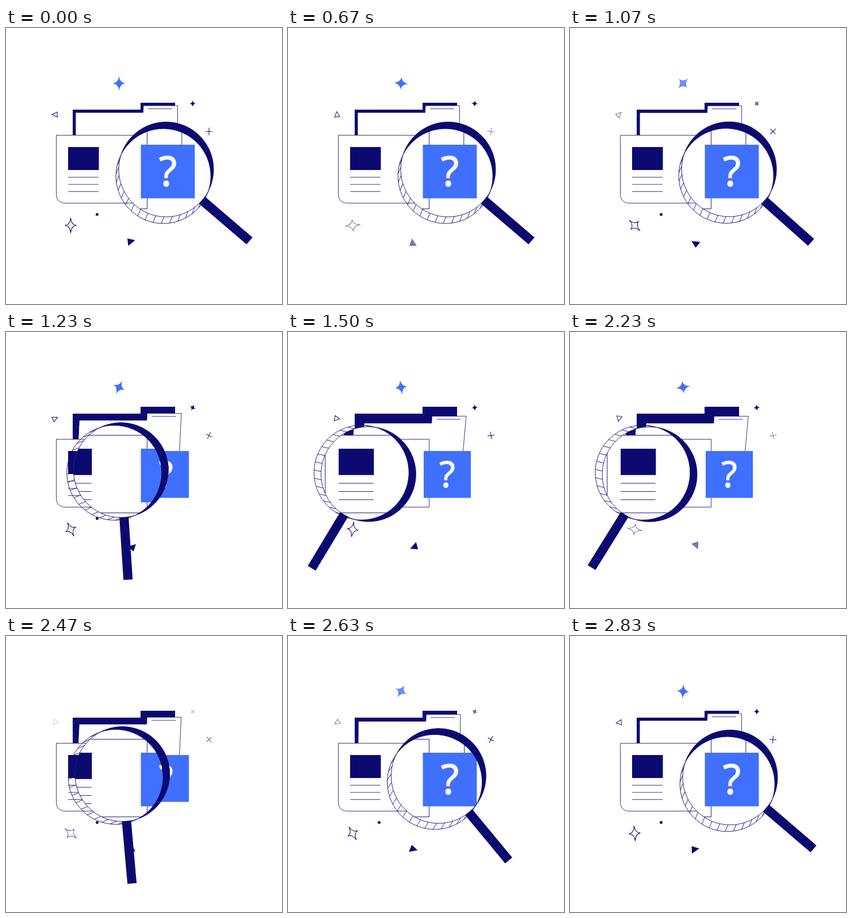
Recreate the animation shown at these times as an HTML page. Size 480 by 480 pixels, loop 2.87 s.

```html
<!DOCTYPE html>
<html lang="en">
<head>
<meta charset="utf-8">
<title>Folder search</title>
<style>
  html, body { margin: 0; width: 100%; height: 100%; overflow: hidden; background: #fff; }
  svg { display: block; width: 100vw; height: 100vh; }
  .line { fill: none; stroke: #0c0a70; stroke-width: .8; }
  .sheet { fill: #fff; stroke: #0c0a70; stroke-width: .8; }
  .navy { fill: #0c0a70; }
  .blue { fill: #4070ff; }
  #decor .line { stroke-width: 1; }
  text {
    font: 63px "Open Sans", "Noto Sans", sans-serif; text-anchor: middle;
    fill: #fff; stroke: #fff; stroke-width: 1.4;
  }
</style>
</head>
<body>
<svg viewBox="0 0 480 480">
  <defs>
    <clipPath id="clip"><circle id="hole" r="82.5"/></clipPath>
  </defs>

  <g id="scene">
    <path class="navy" d="M116 280V142H234V130H294V280Z"/>
    <path class="sheet" id="paper"/>
    <path class="line" id="rule" d="M247 140.5H289"/>
    <path class="sheet" d="M87.5 186.5H245.5V304.5H101.5a14 14 0 0 1-14-14Z"/>
    <path class="navy" d="M108 207H161.5V247H108Z"/>
    <path class="line" d="M108 259.5H161M108 272H161M108 284.5H161"/>
    <path class="blue" d="M236 207H318V288.5H236Z"/>
    <text x="277" y="270.3">?</text>
  </g>

  <g id="decor"></g>

  <circle id="glass" r="82.5" fill="#fff"/>
  <g clip-path="url(#clip)">
    <use href="#scene" transform="translate(246 234.6) scale(1.144) translate(-246 -234.6)"/>
  </g>
  <!-- Rim drawn with its depth along +x -->
  <g id="loupe">
    <path class="navy" d="M6.23-82.26A82.5 82.5 0 1 0 6.23 82.26A82.5 82.5 0 0 1 6.23-82.26Z"/>
    <circle class="line" r="82.5"/>
    <circle class="line" r="82.5" cx="12.46"/>
    <path class="line" id="hatch"/>
    <rect class="navy" x="82" y="-8" width="109" height="16" transform="rotate(-72)"/>
  </g>
</svg>
<script>
const LOOP = 2870, MOVE = 525, OUT = 1041, BACK = 2308, BLINK_GAP = 1560, BLINK_HALF = 200;
const $ = id => document.getElementById(id);
const clamp = v => Math.min(1, Math.max(0, v));

const star = (w, h, c) =>
  `M0 ${-h}Q${c} ${-c} ${w} 0Q${c} ${c} 0 ${h}Q${-c} ${c} ${-w} 0Q${-c} ${-c} 0 ${-h}Z`;

// class, path, centre x, centre y, spin direction, time of first blink
const decor = [
  ['blue', star(11, 12.8, 1.2), 196.6, 96.2, -1, 910],
  ['navy', star(5.5, 6, .5), 324.7, 131.5, -1, 950],
  ['line', 'M-6 0H6M0-6.5V6.5', 353, 180, -1, 780],
  ['line', star(10, 13.3, .8), 112.5, 343.3, 1, 780],
  ['line', 'M-5 0L4-4.5V4.5Z', 85.2, 150.5, 1, 950],
  ['navy', 'M-7.2-6.5L6.3-3.5L-5.5 6.5Z', 218.2, 372.5, -1, 560],
  ['navy', 'M-2.5 0a2.5 2.5 0 0 1 5 0a2.5 2.5 0 0 1-5 0Z', 158.5, 324.3, 1, 670],
].map(([cls, d, x, y, dir, blink]) => {
  const el = document.createElementNS('http://www.w3.org/2000/svg', 'path');
  el.setAttribute('class', cls);
  el.setAttribute('d', d);
  $('decor').append(el);
  return { el, x, y, dir, blink };
});

let ticks = '';
for (let deg = -80; deg <= 80; deg += 10) {
  const a = deg * Math.PI / 180;
  ticks += `M${82.5 * Math.cos(a)} ${82.5 * Math.sin(a)}h12.46`;
}
$('hatch').setAttribute('d', ticks);

// Cubic bezier (.3, 0, .25, 1), solved by bisection
function ease(u) {
  let lo = 0, hi = 1;
  for (let i = 0; i < 20; i++) {
    const s = (lo + hi) / 2, r = 1 - s;
    if (.9 * s * r * r + .75 * s * s * r + s ** 3 < u) lo = s; else hi = s;
  }
  return lo * lo * (3 - 2 * lo);
}

const progress = (t, start) => ease(clamp((t - start) / MOVE));
const fade = (t, mid) => clamp(Math.abs(t - mid) / BLINK_HALF);

function draw(t) {
  const f = progress(t, OUT) - progress(t, BACK);

  const lean = 11.5 * f;
  $('paper').setAttribute('d',
    `M121 280L${121 + lean} ${147 + lean}H${238.4 + lean}L${239 + lean} ${135 + lean}H${298.5 + lean}L298 280Z`);
  $('rule').setAttribute('transform', `translate(${lean} ${lean})`);

  const x = 278.5 - 140 * f;
  const y = 246 + 1.5 * f - 27 * f * (1 - f);
  for (const id of ['hole', 'glass']) {
    $(id).setAttribute('cx', x);
    $(id).setAttribute('cy', y);
  }
  $('loupe').setAttribute('transform', `translate(${x} ${y}) rotate(${112.6 + 81.3 * f})`);

  for (const { el, x, y, dir, blink } of decor) {
    el.setAttribute('transform', `translate(${x} ${y}) rotate(${dir * 360 * t / LOOP})`);
    el.setAttribute('opacity', Math.min(fade(t, blink), fade(t, blink + BLINK_GAP)));
  }
}

const begin = performance.now();
function frame() {
  draw((performance.now() - begin) % LOOP);
  requestAnimationFrame(frame);
}
frame();
</script>
</body>
</html>
```
